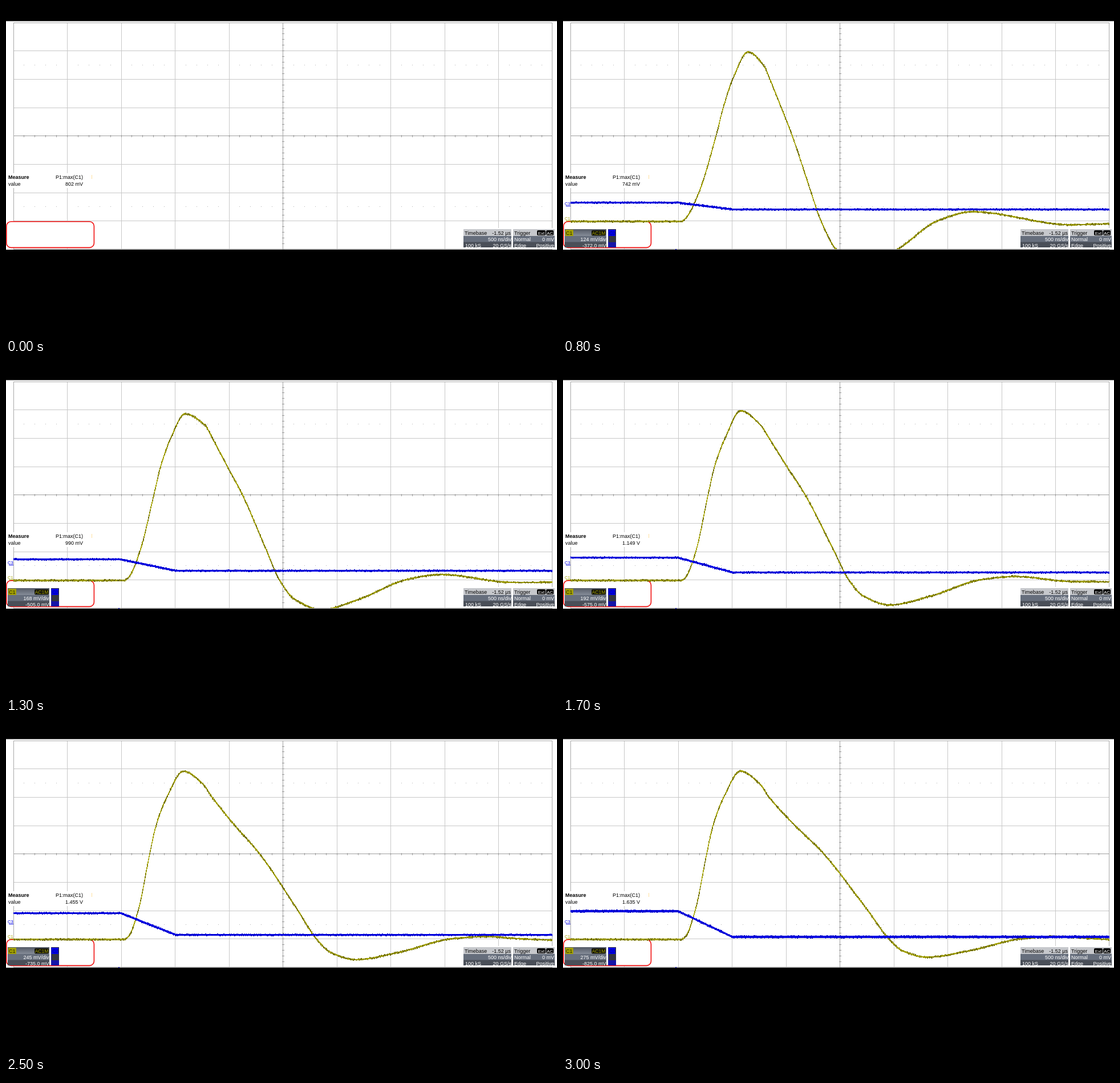
Recreate the animation shown at these times as an HTML page with a canvas. Size 966 by 580 pixels, loop 3100 ms.

```html
<!DOCTYPE html>
<html>
<head>
<meta charset="utf-8">
<style>
  html, body { margin: 0; width: 100%; height: 100%; overflow: hidden; background: #000; }
  canvas { display: block; }
</style>
</head>
<body>
<canvas id="scope" width="966" height="580"></canvas>
<script>
const ctx = document.getElementById('scope').getContext('2d');
const STEP = 100, STEPS = 31;
const OLIVE = '#a3a100', DARK_OLIVE = '#706e00', BLUE = '#0000e6';

// [step, mV per division, measured maximum in mV]
const METER = [
  [0, 0, 0], [4, 62, 372], [8, 124, 742], [13, 168.33, 990],
  [21, 215, 1307], [25, 245, 1455], [30, 275, 1635]
];

// Level crossings: y, x, shift while the signal is small, drift once it saturates
const RISE = [[326, 232, 8, 0], [227, 252, 20, 0], [178, 263, 22, 0], [128, 282, 19, 0]];
const FALL = [
  [105, 345, 9, 0], [128, 361, 2, 0], [178, 381, 0, 1.1],
  [227, 398, 0, 2.5], [326, 428, 0, 4.5], [376, 444, 0, 5.4]
];

function meterAt(step) {
  const i = METER.findIndex(r => r[0] >= step);
  const a = METER[i - 1], b = METER[i], k = (step - a[0]) / (b[0] - a[0]);
  return { perDiv: a[1] + (b[1] - a[1]) * k, max: a[2] + (b[2] - a[2]) * k };
}

function pulsePoints(step, peakY) {
  const small = Math.exp(-((Math.max(0, step - 4) / 9) ** 2));
  const sat = Math.max(0, step - 6.5);
  const place = ([y, x, shift, drift]) => [x + shift * small + drift * sat, y];
  const fall = FALL.map(place);
  const down = fall[fall.length - 1][0];
  const low = 520 + 5 * sat;
  const depth = 52 - 0.87 * sat + 40 * small ** 2;
  const back = 643 + 10 * sat - 0.13 * sat ** 2;
  return [
    [13, 377.5], [207, 377.5], [215, 372],
    ...RISE.map(place), [311 + 20 * small ** 2, peakY], ...fall,
    [down + 0.37 * (low - down), 377 + 0.65 * depth],
    [low, 377 + depth],
    [low + 0.44 * (back - low), 377 + 0.65 * depth],
    [back, 376], [back + 60, 372.5 - 14.5 * small],
    [890, 384 - 0.45 * sat], [960, 382 - 0.2 * sat]
  ];
}

// Monotone cubic through points with increasing x
function curve(pts) {
  const slope = pts.slice(1).map((p, i) => (p[1] - pts[i][1]) / (p[0] - pts[i][0]));
  const tan = pts.map((_, i) => {
    const a = slope[i - 1] || 0, b = slope[i] || 0;
    return a * b > 0 ? 2 * a * b / (a + b) : 0;
  });
  return x => {
    let i = 0;
    while (i < pts.length - 2 && pts[i + 1][0] < x) i++;
    const [x0, y0] = pts[i], [x1, y1] = pts[i + 1], h = x1 - x0, t = (x - x0) / h, u = 1 - t;
    return y0 * u * u * (1 + 2 * t) + y1 * t * t * (3 - 2 * t) + h * t * u * (u * tan[i] - t * tan[i + 1]);
  };
}

function random(seed) {
  return () => (seed = (seed * 16807) % 2147483647) / 2147483647;
}

function box(x, y, w, h, color) {
  ctx.fillStyle = color;
  ctx.fillRect(x, y, w, h);
}

function text(s, x, y, color = '#000', align = 'left', font = '9px') {
  ctx.font = font + ' "Liberation Sans", Arial, sans-serif';
  ctx.textAlign = align;
  ctx.fillStyle = color;
  ctx.fillText(s, x, y);
}

function pill(x, y, w, h, color) {
  ctx.fillStyle = color;
  ctx.beginPath();
  ctx.roundRect(x, y, w, h, 2);
  ctx.fill();
}

function clipTo(x, y, w, h, paint) {
  ctx.save();
  ctx.beginPath();
  ctx.rect(x, y, w, h);
  ctx.clip();
  paint();
  ctx.restore();
}

function drawGrid() {
  box(0, 0, 966, 580, '#000');
  box(0, 26.5, 966, 400.5, '#fff');
  for (let i = 0; i <= 50; i++) {
    const x = Math.floor(13 + i * 18.9);
    if (i % 5 === 0) box(x, 29, 1, 397, '#c8c8c8');
    else {
      box(x, 103, 1, 1, '#b0b0b0');
      box(x, 351, 1, 1, '#b0b0b0');
    }
    box(x, 226, 1, 4, '#999');
  }
  for (let i = 0; i <= 8; i++) box(13, Math.round(28.6 + i * 49.65), 945, 1, '#c8c8c8');
  for (let i = 0; i <= 40; i++) box(484, Math.round(28.6 + i * 9.93), 4, 1, '#999');
  box(13, 227, 945, 1, '#a0a0a0');
  box(485, 29, 1, 397, '#a0a0a0');
  ctx.strokeStyle = '#a8a8a8';
  ctx.lineWidth = 1;
  ctx.strokeRect(13.5, 29.5, 944, 396.5);
}

function drawMeasure(mV) {
  box(0, 293, 153, 26, '#fff');
  text('Measure', 4, 303, '#000', 'left', 'bold 9px');
  text('value', 4, 315);
  text('P1:max(C1)', 135, 303, '#000', 'right');
  text(mV < 1000 ? Math.round(mV) + ' mV' : (mV / 1000).toFixed(3) + ' V', 135, 315, '#000', 'right');
  box(150, 296, 1, 7, '#ffe0a0');
}

function drawMarker() {
  ctx.fillStyle = '#fff';
  ctx.strokeStyle = '#f01010';
  ctx.lineWidth = 1.6;
  ctx.beginPath();
  ctx.roundRect(0.8, 377.8, 153.6, 45.6, 8);
  ctx.fill();
  ctx.stroke();
}

function panel(x, w, header) {
  box(x, 391, w, 32, '#4a4f58');
  box(x, 391, w, 12, header);
  box(x, 403, w, 10, '#666e7c');
  box(x, 413, w, 1, '#5a606c');
}

function drawSettings() {
  box(800, 389, 166, 36, '#fff');
  panel(802, 84, '#c6c8cc');
  text('Timebase', 804, 400.5);
  text('-1.52 µs', 885, 400.5, '#000', 'right');
  panel(889, 73, '#c6c8cc');
  text('Trigger', 891, 400.5);
  pill(931, 393, 15, 9, '#000');
  pill(947, 393, 13, 9, '#000');
  text('Ext', 938.5, 400.5, '#fff', 'center', '8px');
  text('AC', 953.5, 400.5, '#fff', 'center', '8px');
  clipTo(802, 391, 160, 32, () => {
    text('500 ns/div', 886, 412, '#fff', 'right');
    text('100 kS', 805, 423, '#fff');
    text('20 GS/s', 886, 423, '#fff', 'right');
    text('Normal', 891, 412, '#fff');
    text('0 mV', 961, 412, '#fff', 'right');
    text('Edge', 891, 423, '#fff');
    text('Positive', 961, 423, '#fff', 'right');
  });
}

function drawTrace(y, rand, color, dark, half) {
  for (let x = 13; x < 958; x++) {
    const a = y(x), b = y(x + 1), r = rand();
    const top = Math.round(Math.min(a, b) - half), bottom = Math.round(Math.max(a, b) + half);
    box(x, top, 1, bottom - top, rand() < 0.3 ? dark : color);
    if (r < 0.2) box(x, top - 1, 1, 2, dark);
    else if (r > 0.75) box(x, bottom - 1, 1, 2, dark);
  }
}

function drawTraces(step, peakY) {
  const rand = random(step * 7919 + 17);
  const ramp = x => 350.5 + 0.75 * step * (2 * Math.min(1, Math.max(0, (x - 202) / 95)) - 1);
  clipTo(13, 29, 945, 397, () => {
    drawTrace(curve(pulsePoints(step, peakY)), rand, OLIVE, DARK_OLIVE, 1.3);
    drawTrace(ramp, rand, BLUE, '#0000c8', 1.6);
  });
  text('C3', 3, 348.5, BLUE, 'left', '7.5px');
  box(5, 350, 8, 1, BLUE);
  text('C1', 3, 374.5, OLIVE, 'left', '7.5px');
  box(5, 376, 8, 1, OLIVE);
  box(197, 426, 2, 1, BLUE);
}

function drawChannels(step, perDiv) {
  const header = ctx.createLinearGradient(0, 391, 0, 403);
  header.addColorStop(0, '#555b66');
  header.addColorStop(1, '#858c98');
  panel(3, 73, header);
  box(4, 392, 14, 11, OLIVE);
  text('C1', 5, 401, '#202000');
  pill(50, 393, 25, 9.5, '#14140a');
  text('AC1M', 62.5, 401, OLIVE, 'center', '8.5px');
  clipTo(3, 391, 90, 32, () => {
    text(Math.round(perDiv) + ' mV/div', 75.5, 412, '#fff', 'right');
    text(Math.round(-3 * perDiv).toFixed(1) + ' mV', 75.5, 423, '#fff', 'right');
    if (step < 6) {
      ctx.strokeStyle = '#fff';
      ctx.lineWidth = 1;
      ctx.stroke(new Path2D('M9.5 404V412M12.5 404V412M7 410.5L11 415L15 410.5'));
    }
    box(79, 391, 14, 32, '#34363f');
    box(80, 392, 12, 11, BLUE);
    box(79, 391, 1, 32, '#2020a0');
    text('C3', 81, 401, '#000090');
    box(80, 414, 13, 9, '#1515a8');
  });
}

function draw(step) {
  const { perDiv, max } = step ? meterAt(step) : { max: 802 };
  drawGrid();
  drawMeasure(max);
  drawMarker();
  drawSettings();
  if (step) {
    drawTraces(step, 378 - 49.7 * max / perDiv);
    drawChannels(step, perDiv);
  }
}

let shown = -1;
function tick() {
  const step = Math.floor(performance.now() / STEP) % STEPS;
  if (step !== shown) draw(shown = step);
  requestAnimationFrame(tick);
}
tick();
</script>
</body>
</html>
```
